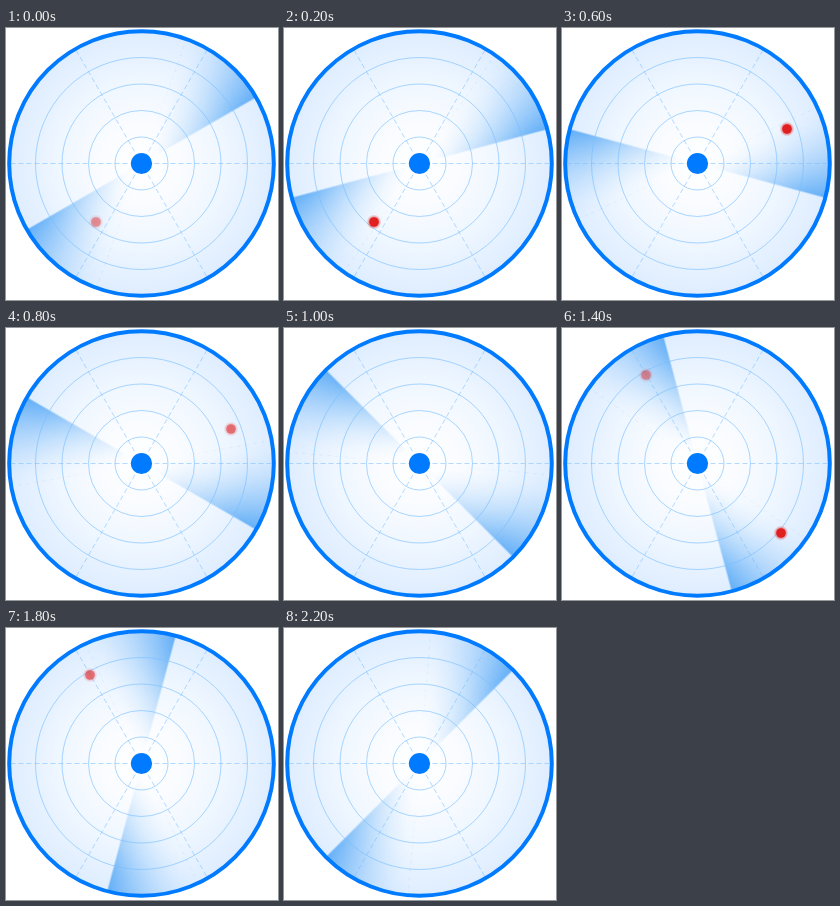
Animation of 272x272 px, one loop 2400 ms. Source, as an HTML page with a canvas:

```html
<!DOCTYPE html>
<html lang="en">
<head>
<meta charset="utf-8">
<title>Radar</title>
<style>
html, body { margin: 0; width: 100%; height: 100%; overflow: hidden; background: #fff; }
canvas { display: block; width: 272px; height: 272px; }
</style>
</head>
<body>
<canvas id="radar" width="272" height="272"></canvas>
<script>
const SIZE = 272, C = 135.5, R = 132;
const STEP = 200, STEPS = 12;
const TAIL = 40 * Math.PI / 180;
const BLUE = '#007bff';

// Each blip lights up one step after the beam has passed it.
const blips = [
  { x: 225, y: 101, start: 2 },
  { x: 219, y: 205, start: 6 },
  { x: 84, y: 47, start: 7 },
  { x: 90, y: 194, start: 0 }
];
const GLOW = [0.36, 1, 0.5];

const ctx = document.getElementById('radar').getContext('2d');

function circle(g, x, y, r) {
  g.beginPath();
  g.arc(x, y, r, 0, Math.PI * 2);
}

function radial(g, x, y, r, stops) {
  const grad = g.createRadialGradient(x, y, 0, x, y, r);
  stops.forEach(([at, color]) => grad.addColorStop(at, color));
  return grad;
}

function layer() {
  const c = document.createElement('canvas');
  c.width = c.height = SIZE;
  return c;
}

// Two opposite wedges with their leading edges on the horizontal axis.
function makeBeam() {
  const c = layer(), g = c.getContext('2d');
  for (const turn of [0, Math.PI]) {
    const grad = g.createConicGradient(turn - TAIL, C, C);
    const span = TAIL / (Math.PI * 2);
    for (let i = 0; i <= 8; i++) {
      const k = i / 8;
      grad.addColorStop(k * span, `rgba(0,125,240,${0.56 * Math.pow(k, 1.6)})`);
    }
    g.fillStyle = grad;
    g.beginPath();
    g.moveTo(C, C);
    g.arc(C, C, R, turn - TAIL, turn);
    g.fill();
  }
  g.globalCompositeOperation = 'destination-in';
  g.fillStyle = radial(g, C, C, R, [
    [0, 'rgba(0,0,0,0)'], [0.15, 'rgba(0,0,0,0.03)'],
    [0.5, 'rgba(0,0,0,0.4)'], [0.85, 'rgba(0,0,0,0.88)'], [1, '#000']
  ]);
  g.fillRect(0, 0, SIZE, SIZE);
  return c;
}

function makeGrid() {
  const c = layer(), g = c.getContext('2d');
  g.lineWidth = 1;
  g.strokeStyle = 'rgba(120,190,255,0.62)';
  for (let i = 1; i <= 4; i++) {
    circle(g, C, C, 26.5 * i);
    g.stroke();
  }
  g.setLineDash([5, 3]);
  g.strokeStyle = 'rgba(120,190,255,0.55)';
  for (let i = 0; i < 3; i++) {
    const a = i * Math.PI / 3, dx = 131 * Math.cos(a), dy = 131 * Math.sin(a);
    g.beginPath();
    g.moveTo(C - dx, C - dy);
    g.lineTo(C + dx, C + dy);
    g.stroke();
  }
  return c;
}

const beam = makeBeam(), grid = makeGrid();
const face = radial(ctx, C, C, R, [
  [0, '#ffffff'], [0.3, '#fafcff'], [0.65, '#eef6ff'], [1, '#deedff']
]);

function drawBlip(x, y, alpha) {
  ctx.globalAlpha = alpha;
  ctx.fillStyle = radial(ctx, x, y, 7.5, [
    [0, 'rgba(224,32,32,0.65)'], [0.6, 'rgba(224,32,32,0.5)'], [1, 'rgba(224,32,32,0)']
  ]);
  circle(ctx, x, y, 7.5);
  ctx.fill();
  ctx.fillStyle = '#e02020';
  circle(ctx, x, y, 4.8);
  ctx.fill();
  ctx.globalAlpha = 1;
}

function draw(step) {
  ctx.fillStyle = '#fff';
  ctx.fillRect(0, 0, SIZE, SIZE);
  ctx.fillStyle = face;
  circle(ctx, C, C, R);
  ctx.fill();

  ctx.save();
  ctx.translate(C, C);
  ctx.rotate((step * 15 - 30) * Math.PI / 180);
  ctx.drawImage(beam, -C, -C);
  ctx.restore();

  ctx.drawImage(grid, 0, 0);

  for (const { x, y, start } of blips) {
    const alpha = GLOW[(step - start + STEPS) % STEPS];
    if (alpha) drawBlip(x, y, alpha);
  }

  ctx.strokeStyle = BLUE;
  ctx.lineWidth = 4;
  circle(ctx, C, C, 132.3);
  ctx.stroke();
  ctx.fillStyle = BLUE;
  circle(ctx, C, C, 10.6);
  ctx.fill();
}

const begin = performance.now();
function tick() {
  const t = performance.now() - begin;
  draw(Math.floor(t / STEP) % STEPS);
  requestAnimationFrame(tick);
}
tick();
</script>
</body>
</html>
```
